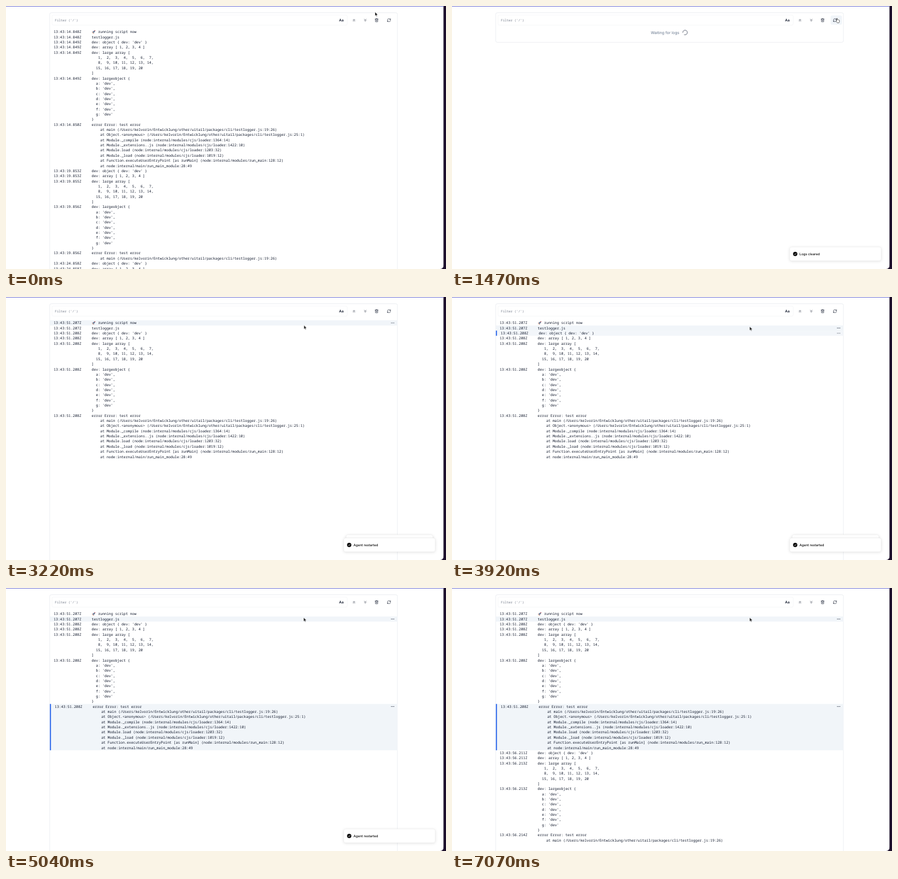
These frames come from a looping animation (800x478 px, 8 s). An HTML page:

```html
<!DOCTYPE html>
<html lang="en">
<head>
<meta charset="utf-8">
<title>Log viewer</title>
<style>
html, body { margin: 0; width: 100%; height: 100%; overflow: hidden; background: #fff; }
svg { display: block; width: 800px; height: 478px; }
text { text-rendering: geometricPrecision; font-family: Inter, "Open Sans", sans-serif; fill: #0f172a; }
.mono { font-family: "Noto Sans Mono", "DejaVu Sans Mono", monospace; font-size: 6.46px; }
.icon { fill: none; stroke: #0f172a; stroke-width: 2; stroke-linecap: round; stroke-linejoin: round; }
.edge { fill: #fff; stroke: #e4e8ee; stroke-width: .6; }
.hover { fill: #f1f5f9; }
.toast rect { fill: #fff; stroke: #e6e6e6; stroke-width: .5; filter: drop-shadow(0 1.9px 2.6px rgba(0, 0, 0, .11)); }
.toast text { font-size: 6px; font-weight: 500; fill: #0a0a0a; }
.toast { transform-box: fill-box; transform-origin: center; }

#cursor { animation: move 8s ease-in-out infinite; }
@keyframes move {
  0%, 5.249% { transform: translate(671px, 11px); }
  5.25%, 14.8% { transform: translate(674px, 25px); }
  16.6%, 26.2% { transform: translate(700px, 22px); }
  31.5%, 35% { transform: translate(556px, 37px); }
  40.2%, 41% { transform: translate(541.7px, 51.4px); }
  42%, 100% { transform: translate(541.2px, 53.8px); }
}
#spin { animation: spin 8s linear infinite; }
@keyframes spin {
  0%, 5.25% { transform: rotate(-72deg); }
  10.5%, 14.875% { transform: rotate(79deg); }
  21.75%, 100% { transform: rotate(277deg); }
}
#cleared { animation: cleared 8s ease infinite; }
@keyframes cleared {
  0%, 5.1% { transform: translateY(25px); opacity: 0; }
  10.3%, 18.6% { transform: none; opacity: 1; }
  23.6%, 55% { transform: translateY(-6.5px) scale(.95); opacity: 1; }
  57.7%, 100% { transform: translateY(-6.5px) scale(.95); opacity: 0; }
}
#restarted { animation: restarted 8s ease infinite; }
@keyframes restarted {
  0%, 18.6% { transform: translateY(25px); opacity: 0; }
  23.6%, 71.2% { transform: none; opacity: 1; }
  75%, 100% { transform: translateY(20px); opacity: 0; }
}
</style>
</head>
<body>
<svg id="stage" viewBox="0 0 800 478"></svg>
<script>
const LOOP = 8000, TOP = 42.4, ROW = 9.352;
const CLEAR = 420, RESTART = 1740, BATCH = 6860;
const rules = [];

const pct = ms => (ms / LOOP * 100).toFixed(3) + '%';

function keyframes(body, timing) {
  const name = 'k' + rules.length;
  rules.push(`@keyframes ${name}{${body}}`);
  return `style="animation:${name} ${LOOP}ms ${timing} infinite"`;
}

// Visible between two times, with an optional fade at both ends
function show(from, to, fade = 0) {
  const at = (ms, o) => `${pct(ms)}{opacity:${o}}`;
  if (!fade) return keyframes(at(0, from ? 0 : 1) + at(from, 1) + at(to, 0), 'step-end');
  const end = to < LOOP ? at(to, 1) + at(to + fade, 0) + at(LOOP, 0) : at(LOOP, 1);
  return keyframes(at(0, 0) + at(from, 0) + at(from + fade, 1) + end, 'linear');
}

const indent = (from, to) => keyframes(
  `0%{transform:none}${pct(from)}{transform:translateX(1.9px)}${pct(to)}{transform:none}`, 'step-end');

const esc = s => s.replace(/</g, '&lt;').replace(/ /g, '\u00a0');
const mono = (x, row, s) =>
  `<text class="mono" x="${x}" y="${(TOP + row * ROW + 6.95).toFixed(2)}">${esc(s)}</text>`;

const script = '/Users/kelvorin/Entwicklung/other/uitail/packages/cli/testlogger.js';
const trace = [
  `main (${script}:19:26)`,
  `Object.<anonymous> (${script}:25:1)`,
  'Module._compile (node:internal/modules/cjs/loader:1364:14)',
  'Module._extensions..js (node:internal/modules/cjs/loader:1422:10)',
  'Module.load (node:internal/modules/cjs/loader:1203:32)',
  'Module._load (node:internal/modules/cjs/loader:1019:12)',
  'Function.executeUserEntryPoint [as runMain] (node:internal/modules/run_main:128:12)',
  'node:internal/main/run_main_module:28:49'
].map(s => '    at ' + s);

const intro = [['   running script now'], ['testlogger.js']];
const body = depth => [
  ["dev: object { dev: 'dev' }"],
  ['dev: array [ 1, 2, 3, 4 ]'],
  ['dev: large array [', '   1,  2,  3,  4,  5,  6,  7,', '   8,  9, 10, 11, 12, 13, 14,',
    '  15, 16, 17, 18, 19, 20', ']'],
  ['dev: largeobject {', ...[...'abcdefg'].map(k => `  ${k}: 'dev'${k < 'g' ? ',' : ''}`), '}'],
  ['error Error: test error', ...trace.slice(0, depth)]
];

const rocket = `<g transform="translate(159.5 47) rotate(45)">
  <path d="M-1.3 .6L-2.5 2.4-1 2.2ZM1.3 .6L2.5 2.4 1 2.2Z" fill="#c8323c"/>
  <path d="M-.7 2.3L0 4 .7 2.3Z" fill="#f59e2b"/>
  <path d="M0-4C2-2 1.7 1 1 2.4H-1C-1.7 1-2 -2 0-4Z" fill="#8794a3"/>
  <path d="M0-4L1.1-2.4H-1.1Z" fill="#c8323c"/><circle cy="-.6" r=".7" fill="#2b5f9e"/></g>`;

// Start times of the keyboard selection, by entry index
const picks = [null, 3570, 3850, 4200, 4410, 4530, 4758, LOOP];

const dots = y => [700.8, 703, 705.2].map(x => `<circle cx="${x}" cy="${y}" r=".6" fill="#0f172a"/>`).join('');

function band(row, count, from, to, fade, selected) {
  const y = TOP + row * ROW;
  const bar = selected
    ? `<rect x="79.8" y="${y}" width="1.9" height="${count * ROW}" fill="#2563eb" ${show(from, to)}/>` : '';
  return `<g ${show(from, to, fade)}><rect class="hover" x="79.8" y="${y}" width="632" height="${count * ROW}"/>
    ${dots(y + 4.7)}</g>${bar}`;
}

function logs(entries, prefix, stamps, row = 0, selectable = false) {
  let out = '';
  entries.forEach((lines, i) => {
    const from = selectable && picks[i], to = picks[i + 1];
    if (from) out += band(row, lines.length, from, to, 85, true);
    const text = mono(86.7, row, `13:43:${prefix}.${stamps[i]}Z`) +
      lines.map((s, k) => mono(155.8, row + k, s)).join('');
    out += `<g ${from ? indent(from, to) : ''}>${text}${lines === intro[0] ? rocket : ''}</g>`;
    row += lines.length;
  });
  return out;
}

const icon = (x, y, d) =>
  `<path class="icon" transform="translate(${x} ${y}) scale(.312) translate(-12 -12)" d="${d}"/>`;

const button = (x, from, to) =>
  `<rect class="hover" x="${x - 9.6}" y="17.3" width="20.6" height="16.8" rx="2.5" ${show(from, to)}/>`;

const toast = (id, label) => `<g class="toast" id="${id}">
  <rect x="614" y="438" width="166.4" height="25" rx="3.6"/>
  <circle cx="624" cy="450.6" r="3.9" fill="#0a0a0a"/>
  <path d="M622.2 450.7L623.5 452 625.9 449.4" fill="none" stroke="#fff" stroke-width=".8"/>
  <text x="631.8" y="452.7">${label}</text></g>`;

const card = (height, attr) =>
  `<rect class="edge" x="79.6" y="12.2" width="632" height="${height}" rx="3" ${attr}
    filter="drop-shadow(0 .6px .7px rgba(0,0,0,.08))"/>`;

const toolbar = `
  <rect class="edge" x="83.7" y="16.4" width="536.6" height="18.4" rx="2.5" style="stroke:#eef0f3"/>
  <text class="mono" x="89" y="27.6" style="font-size:5.85px;fill:#737b8a">Filter\u00a0('/')</text>
  <text x="605.6" y="28" font-size="6.4" font-weight="600">Aa</text>
  ${button(674, CLEAR, 1230)}${button(698, 1280, 2170)}
  ${icon(632.7, 25.8, 'M17 11l-5-5-5 5M17 18l-5-5-5 5')}
  ${icon(653.2, 25.8, 'M7 6l5 5 5-5M7 13l5 5 5-5')}
  ${icon(673.8, 25.7, 'M3 6h18M19 6v14c0 1-1 2-2 2H7c-1 0-2-1-2-2V6M8 6V4c0-1 1-2 2-2h4c1 0 2 1 2 2v2M10 11v6M14 11v6')}
  ${icon(696.3, 25.8, 'M3 12a9 9 0 0 1 9-9 9.75 9.75 0 0 1 6.74 2.74L21 8M21 3v5h-5M21 12a9 9 0 0 1-9 9 9.75 9.75 0 0 1-6.74-2.74L3 16M8 16H3v5')}`;

const waiting = `<g ${show(CLEAR, RESTART)}>
  <text x="361.5" y="50.7" font-size="7" style="fill:#64748b">Waiting for logs</text>
  <g transform="translate(423.7 48.2)"><path id="spin" d="M4.2 0A4.2 4.2 0 1 1 1.3-4"
    fill="none" stroke="#475063" stroke-width=".95" stroke-linecap="round"/></g></g>`;

const firstRun = `<g ${show(0, CLEAR)}>
  ${logs([...intro, ...body(8)], 14, [848, 848, 849, 849, 849, 849, 850])}
  ${logs(body(1), 19, [853, 853, 855, 856, 856], 27)}
  ${logs(body(1).slice(0, 2), 24, [858, 858], 45)}</g>`;

const secondRun = `<g ${show(RESTART, LOOP)}>
  ${band(0, 1, 2950, 3300, 60)}${band(1, 1, 3300, LOOP, 60)}
  ${logs([...intro, ...body(8)], 51, [207, 207, 208, 208, 208, 208, 208], 0, true)}
  <g ${show(BATCH, LOOP)}>${logs(body(1), 56, [211, 211, 213, 213, 214], 27)}</g></g>`;

const cursor = `<g id="cursor" stroke="#fff" stroke-width=".45" fill="#111">
  <path d="M0 0V7L1.6 5.5 2.7 8 3.8 7.5 2.7 5.1H4.9Z" ${show(0, CLEAR)}/>
  <path d="M0 0V7L1.6 5.5 2.7 8 3.8 7.5 2.7 5.1H4.9Z" ${show(2170, LOOP)}/>
  <path d="M-.6 .6Q0-.3 .6 .6V3Q1.4 2.4 1.9 3.2 2.7 2.7 3.2 3.5 4.2 3.1 4.5 4.1V6Q4.3 7.3 3.6 8.6H.4Q-.5 7-2 5.2-1.8 4.2-.6 5Z"
    fill="#fff" style="stroke:#222;stroke-width:.65" transform="translate(0 0)" ${show(CLEAR, 2170).replace('style="', 'data-hand style="stroke:#222;').replace('style="stroke:#222;', 'style="stroke:#222;stroke-width:.65;')}/>
</g>`.replace('style="stroke:#222;stroke-width:.65" transform="translate(0 0)" ', '').replace('data-hand ', '');

document.getElementById('stage').innerHTML = `
  <rect width="800" height="478" fill="#1c0f2b"/>
  <path d="M0 0H795.4V474Q795.4 478 791.4 478H0Z" fill="#fff"/>
  <rect width="795.4" height="1" fill="#6e72d6"/>
  ${card(480, show(0, CLEAR))}${card(480, show(RESTART, LOOP))}${card(53.8, show(CLEAR, RESTART))}
  ${toolbar}${waiting}${firstRun}${secondRun}
  ${toast('cleared', 'Logs cleared')}${toast('restarted', 'Agent restarted')}
  ${cursor}
  <path d="M795.4 470V478H789.4Q795.4 478 795.4 470Z" fill="#1c0f2b"/>`;

const sheet = document.createElement('style');
sheet.textContent = rules.join('\n');
document.head.append(sheet);
</script>
</body>
</html>
```
